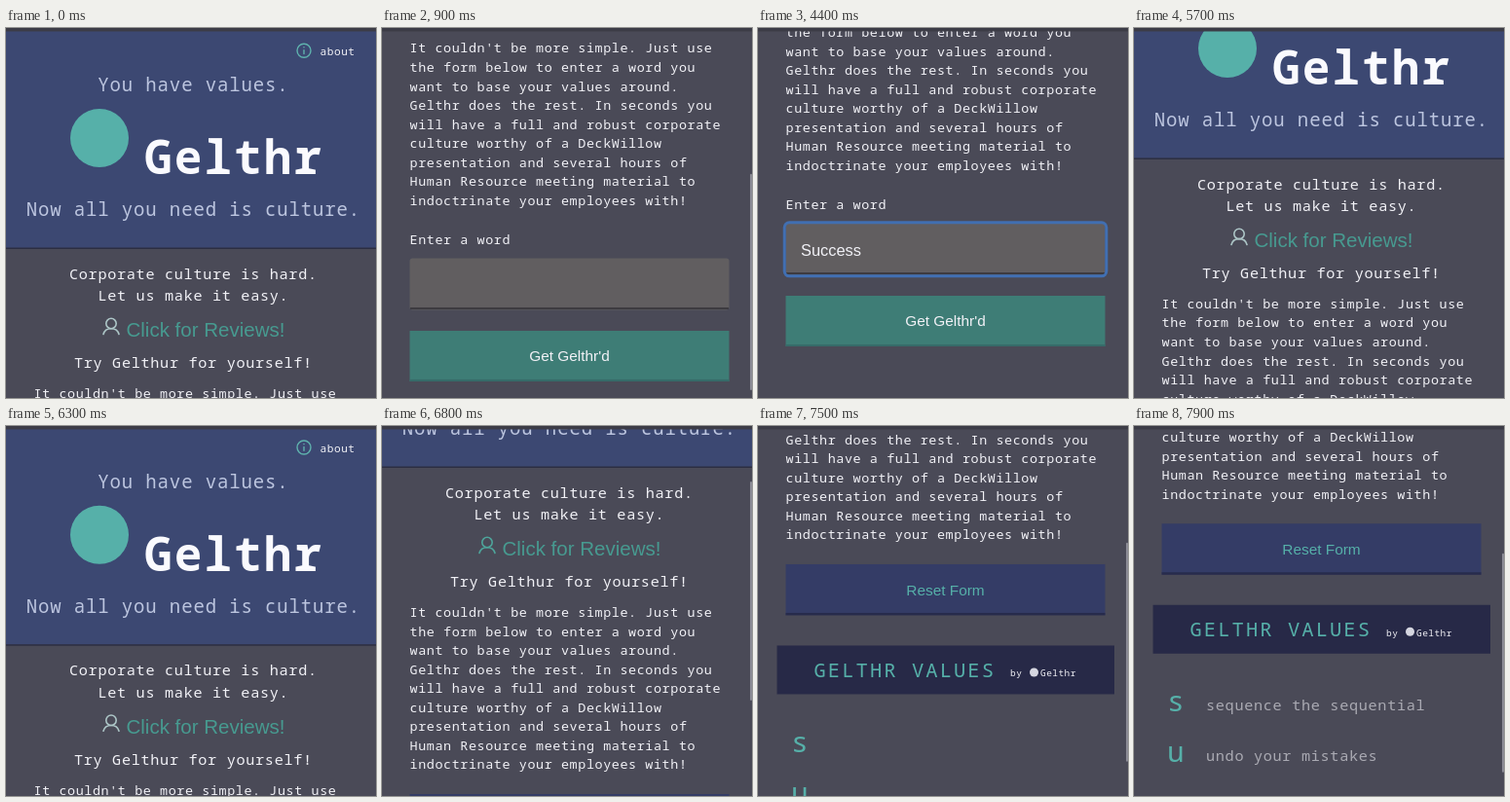
An HTML page for the animation above (8000 ms loop, 380 by 380 pixels).

```html
<!DOCTYPE html>
<html lang="en">
<head>
<meta charset="utf-8">
<title>Gelthr</title>
<style>
  html, body { margin: 0; width: 100%; height: 100%; overflow: hidden; background: #4a4a57; }
  svg { display: block; width: 380px; height: 380px; }
  text { fill: #f1f1f6; white-space: pre; }
  .mono { font-family: "Noto Sans Mono", "DejaVu Sans Mono", monospace; letter-spacing: .045em; }
  .sans { font-family: "Liberation Sans", Arial, sans-serif; }
  .mid { text-anchor: middle; }
  .tag { font-size: 19px; font-weight: 300; fill: #bcc5df; }
  .brand { font-size: 47.6px; font-weight: 700; fill: #fafafe; }
  .lead { font-size: 15.2px; }
  .body { font-size: 13.4px; }
  .small { font-size: 11.2px; }
  .tiny { font-size: 9.5px; }
  .link { font-size: 20.5px; fill: #479a90; }
  .button { font-size: 15.4px; }
  .field { font-size: 16.4px; }
  .title { font-size: 20.5px; letter-spacing: 2.05px; }
  .initial { font-size: 29.5px; }
  .teal { fill: #56b0a9; }
  .line { fill: none; stroke: #5fb3ae; stroke-width: 1.4; stroke-linecap: round; }
</style>
</head>
<body>
<svg viewBox="0 0 380 380">
  <rect width="380" height="380" fill="#4a4a57"/>
  <g id="page">
    <rect y="-20" width="380" height="246" fill="#3c4872"/>
    <rect y="225.5" width="380" height="1.5" fill="#2c2e42"/>
    <g class="line">
      <circle cx="306" cy="23.3" r="7"/>
      <path d="M306 22.8v3.8M306 19.8v.1"/>
    </g>
    <text class="mono small" x="322.5" y="28">about</text>
    <text class="mono tag mid" x="192.4" y="65">You have values.</text>
    <circle class="teal" cx="96" cy="113" r="30"/>
    <text class="mono brand" x="142" y="150">Gelthr</text>
    <text class="mono tag mid" x="192.4" y="193">Now all you need is culture.</text>

    <text class="mono lead mid" x="192.4" y="257.7">Corporate culture is hard.</text>
    <text class="mono lead mid" x="192.4" y="280">Let us make it easy.</text>
    <g id="user" class="line" style="stroke-width:1.6">
      <circle cx="108" cy="303.5" r="5.2"/>
      <path d="M100 314.5c1-4 4-5.8 8-5.8s7 1.8 8 5.8"/>
    </g>
    <text class="sans link" x="123.5" y="317">Click for Reviews!</text>
    <text class="mono lead mid" x="192.4" y="349">Try Gelthur for yourself!</text>
    <g id="intro"></g>

    <g id="form">
      <text class="mono body" x="28.5" y="576.5">Enter a word</text>
      <rect x="28.5" y="591" width="328" height="53" rx="3" fill="#615e60"/>
      <rect x="29" y="641.5" width="327" height="2" fill="#3d3b40"/>
      <rect id="ring" x="27.2" y="590.3" width="330.6" height="55" rx="5" fill="none" stroke="#416fb2" stroke-width="3"/>
      <rect id="mark" x="41" y="606.5" height="23" fill="#6b7082"/>
      <text id="word" class="sans field" x="44" y="624.3"></text>
      <rect id="caret" y="607.5" width="2" height="21" fill="#6f9fe4"/>
      <rect x="28.5" y="665.5" width="328" height="52" fill="#3e7d76"/>
      <rect x="28.5" y="715.5" width="328" height="2" fill="#366b69"/>
      <text class="sans button mid" x="192.5" y="696.7">Get Gelthr'd</text>
    </g>

    <g id="result">
      <rect x="28.5" y="562" width="328" height="52" fill="#343c66"/>
      <rect x="28.5" y="612" width="328" height="2.5" fill="#272b4c"/>
      <text class="sans button teal mid" x="192.5" y="593.7">Reset Form</text>
      <rect x="19.5" y="645.5" width="346.5" height="50" fill="#272947"/>
      <text class="mono title teal" x="57.5" y="678">GELTHR VALUES</text>
      <text class="mono tiny" x="259" y="677.5">by</text>
      <circle cx="283.5" cy="673" r="4.5" fill="#d5d6e0"/>
      <text class="mono tiny" x="290" y="677.5">Gelthr</text>
      <text class="mono initial teal" x="34" y="755">s</text>
      <text class="mono initial teal" x="34" y="807">u</text>
      <g id="values">
        <text class="mono lead" x="74" y="754">sequence the sequential</text>
        <text class="mono lead" x="74" y="806">undo your mistakes</text>
      </g>
    </g>
  </g>
  <rect id="bar" x="378" width="2" rx="1" fill="#8b8b95"/>
  <rect width="380" height="3.5" fill="#3c3c46"/>
</svg>
<script>
const LOOP = 8000, STEP = 100, FORM_Y = 390.5, SWAP = 5800;
const KEYS = [1700, 2000, 2300, 2600, 2900, 3100, 3600];
const FOCUS = 1600, COMMIT = 4000;
const $ = id => document.getElementById(id);
const clamp = v => Math.min(1, Math.max(0, v));
const span = (t, from, to) => clamp((t - from) / (to - from));
const show = (id, on) => { $(id).style.display = on ? '' : 'none'; };

const INTRO = [
  "It couldn't be more simple. Just use",
  'the form below to enter a word you',
  'want to base your values around.',
  'Gelthr does the rest. In seconds you',
  'will have a full and robust corporate',
  'culture worthy of a DeckWillow',
  'presentation and several hours of',
  'Human Resource meeting material to',
  'indoctrinate your employees with!'
];
INTRO.forEach((line, i) => {
  const text = document.createElementNS('http://www.w3.org/2000/svg', 'text');
  text.setAttribute('class', 'mono body');
  text.setAttribute('x', 28.5);
  text.setAttribute('y', 380 + i * 19.55);
  text.textContent = line;
  $('intro').append(text);
});

function scrollAt(t) {
  if (t < 5050) return FORM_Y * (1 - (1 - span(t, 50, 1600)) ** 3);
  if (t < 6500) return FORM_Y * (1 - span(t, 5050, 6400)) ** 2.2;
  if (t < 6800) return 184 * span(t, 6500, 6800) ** 1.1;
  return 495 - 311 * Math.exp((6800 - t) / 492);
}

function drawField(t) {
  const typed = 'Success'.slice(0, KEYS.filter(k => t >= k).length);
  const editing = t >= FOCUS && t < COMMIT;
  $('word').textContent = typed;
  const width = typed ? $('word').getComputedTextLength() : 0;
  $('mark').setAttribute('width', width + 3);
  $('caret').setAttribute('x', 43.5 + width);
  show('ring', t >= FOCUS);
  show('mark', editing && typed);
  show('caret', editing);
}

function drawBar(t, y) {
  const late = t >= 6600;
  const top = 8 + y * (late ? .266 : .4);
  $('bar').setAttribute('y', top);
  $('bar').setAttribute('height', late ? 225 : 372 - top);
  $('bar').style.opacity = late ? 1 : span(t, 0, 100) * (1 - span(t, 1400, 1700));
}

function draw(t) {
  const y = scrollAt(t);
  $('page').setAttribute('transform', `translate(0 ${-y})`);
  show('form', t < SWAP);
  show('result', t >= SWAP);
  if (t < SWAP) drawField(t);
  drawBar(t, y);
  $('user').style.stroke = t < 6500 ? '#adc6c7' : '#4ea59b';
  $('values').style.opacity = span(t, 7500, 8200);
}

// The picture advances in tenths of a second; a small lead covers display delay.
function tick() {
  const t = (performance.now() + 20) % LOOP;
  draw(Math.floor(t / STEP) * STEP);
  requestAnimationFrame(tick);
}
tick();
</script>
</body>
</html>
```
